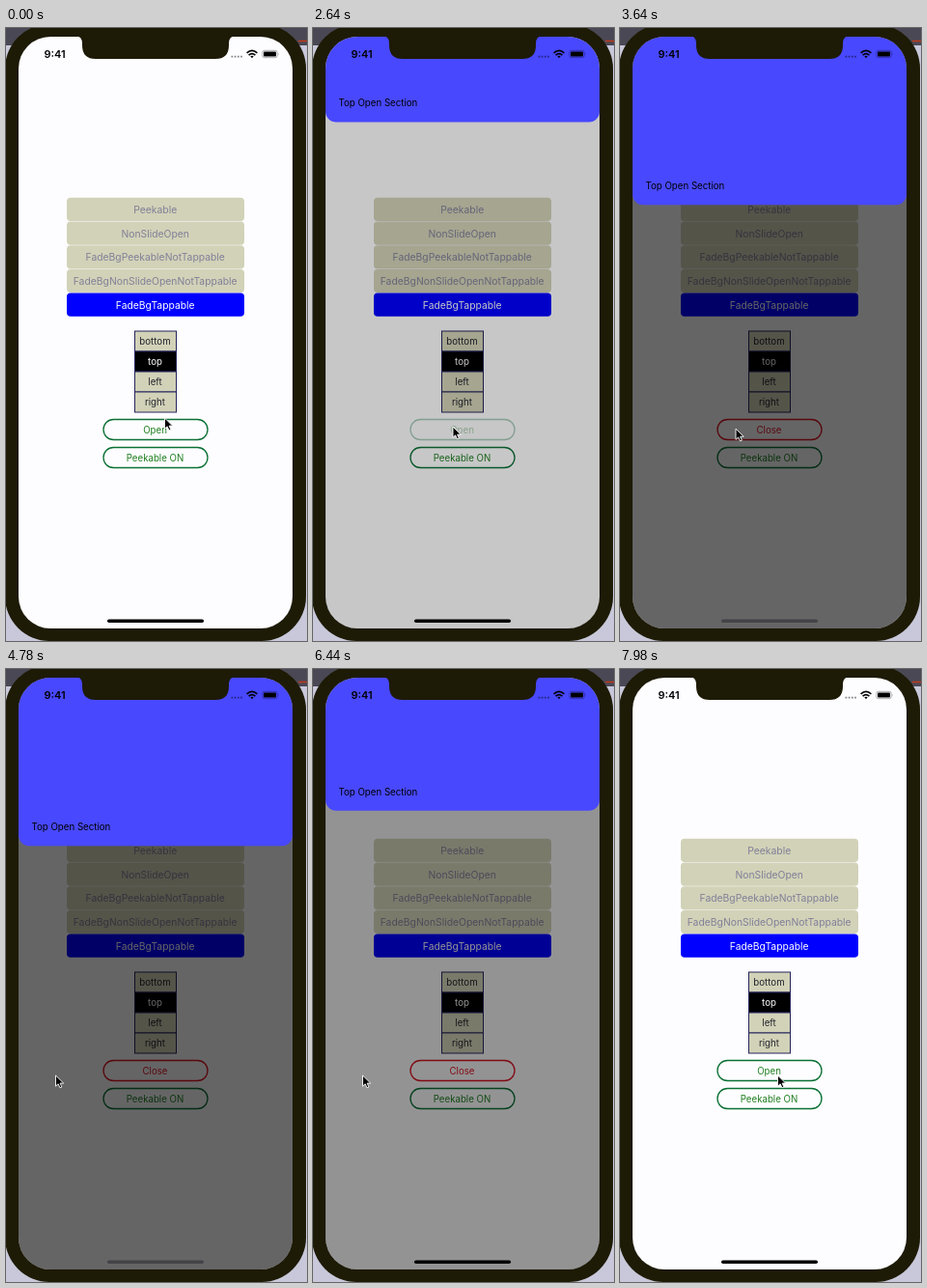
These frames come from a looping animation (312x635 px, 8 s). An HTML page:

```html
<!DOCTYPE html>
<html lang="en">
<head>
<meta charset="utf-8">
<style>
  html, body { margin: 0; width: 100%; height: 100%; overflow: hidden; background: #c8c8da; }
  svg { display: block; width: 100vw; height: 100vh; }
  text { font-family: Inter, sans-serif; font-size: 9.7px; }
  .mid { text-anchor: middle; }
  .pill { fill: #fdfdff; stroke-width: 1.3; }
</style>
</head>
<body>
<svg viewBox="0 0 312 635">
  <defs>
    <clipPath id="screen"><rect x="13" y="9" width="284" height="613" rx="33"/></clipPath>
  </defs>

  <rect width="312" height="635" fill="#c8c8da"/>
  <rect width="312" height="18" fill="#4a4854"/>
  <path d="M303 13.5H312" stroke="#c0391c" stroke-width="1.5"/>
  <rect x="-1" y="-4" width="312" height="639" rx="46" fill="#1d1a05"/>

  <g clip-path="url(#screen)">
    <rect x="13" y="9" width="284" height="613" fill="#fdfdff"/>
    <g id="options"></g>
    <g id="sides"></g>
    <g id="openButton">
      <rect class="pill" x="101" y="405.5" width="108" height="21" rx="10.5"/>
      <text class="mid" x="154.5" y="419.5"></text>
    </g>
    <rect class="pill" x="101" y="434.5" width="108" height="21" rx="10.5" stroke="#0b7034"/>
    <text class="mid" x="154.5" y="448.5" fill="#1f7f1f">Peekable ON</text>

    <rect id="shade" x="13" y="9" width="284" height="613"/>
    <g id="panel">
      <rect x="13" y="-260" width="284" height="260" rx="11" fill="#4848ff"/>
      <text x="26.5" y="-16.2">Top Open Section</text>
    </g>
    <rect id="homeBar" x="105" y="612.5" width="100" height="3.5" rx="1.75"/>
  </g>

  <path d="M73 8Q79 9 79 16V18Q79 32 93 32H217Q231 32 231 18V16Q231 9 237 8Z" fill="#1d1a05"/>
  <text x="39.5" y="31" style="font-size:11px;font-weight:600">9:41</text>
  <path d="M233.5 29.7H245" stroke="#0007" stroke-width="1.8" stroke-dasharray="1.8 1.4"/>
  <g fill="none" stroke="#000" stroke-width="1.7">
    <path d="M249.6 25.8Q255 21 260.4 25.8M251.6 28.1Q255 25.2 258.4 28.1"/>
  </g>
  <path d="M253.3 29.3Q255 28 256.7 29.3L255 31.2Z"/>
  <rect x="265.8" y="23.3" width="15.4" height="7.4" rx="2" fill="none" stroke="#0006" stroke-width=".8"/>
  <rect x="267" y="24.4" width="13" height="5.2" rx="1"/>
  <path d="M282.3 25.6q1.2 1.4 0 2.8z" fill="#0006"/>

  <path id="cursor" d="M0 0V11.2L2.6 8.8L4.5 12.8L6.4 12L4.6 8.1H8.2Z" stroke="#fff" stroke-width=".9"/>
</svg>
<script>
const $ = id => document.getElementById(id);
const LOOP = 8000, SLIDE = 466, OPEN_AT = 2406, CLOSE_AT = 6302;

const options = ['Peekable', 'NonSlideOpen', 'FadeBgPeekableNotTappable',
                 'FadeBgNonSlideOpenNotTappable', 'FadeBgTappable'];
$('options').innerHTML = options.map((label, i) => {
  const y = 175.8 + i * 24.7, active = i === 4;
  return `<rect x="63" y="${y}" width="184" height="24.2" rx="4" fill="${active ? '#00f' : '#d2d2b8'}"/>
    <text class="mid" x="154.7" y="${y + 16}" style="font-size:10.35px" fill="${active ? '#fff' : '#827f98'}">${label}</text>`;
}).join('');

$('sides').innerHTML = ['bottom', 'top', 'left', 'right'].map((label, i) => {
  const y = 314 + i * 21, active = i === 1;
  return `<rect x="133.5" y="${y}" width="43" height="21" fill="${active ? '#000' : '#d2d2b8'}" stroke="#24245c"/>
    <text class="mid" x="154.5" y="${y + 13.7}" fill="${active ? '#fff' : '#22222c'}">${label}</text>`;
}).join('');

const clamp = v => Math.min(1, Math.max(0, v));
const easeIn = v => v ** 1.68;
const easeInOut = v => v < .5 ? easeIn(2 * v) / 2 : 1 - easeIn(2 - 2 * v) / 2;
const ramp = (t, start, length) => easeInOut(clamp((t - start) / length));

// Pointer moves: start, duration, dx, dy
const moves = [[1300, 600, -19.5, 9], [3400, 700, -93.5, 8], [7000, 750, 112, 0]];
const label = $('openButton').querySelector('text');
const outline = $('openButton').querySelector('rect');

function draw(t) {
  const shown = ramp(t, OPEN_AT, SLIDE) - ramp(t, CLOSE_AT, SLIDE);
  $('panel').setAttribute('transform', `translate(0 ${9 + 174.3 * shown})`);
  $('shade').setAttribute('opacity', .6 * Math.max(0, shown) ** 1.5);
  $('homeBar').setAttribute('fill', shown > .9 ? '#444448' : '#000');

  const isOpen = t > OPEN_AT + SLIDE && t < CLOSE_AT + SLIDE;
  label.textContent = isOpen ? 'Close' : 'Open';
  label.setAttribute('fill', isOpen ? '#dc1420' : '#1f7f1f');
  outline.setAttribute('stroke', isOpen ? '#dc1420' : '#0b7034');
  const pressed = ramp(t, OPEN_AT - 60, 150) - ramp(t, 2810, 200);
  $('openButton').setAttribute('opacity', 1 - .65 * pressed);

  let x = 164.5, y = 404;
  for (const [start, length, dx, dy] of moves) {
    const k = ramp(t, start, length);
    x += dx * k;
    y += dy * k;
  }
  $('cursor').setAttribute('transform', `translate(${x} ${y})`);
}

function tick() {
  draw(performance.now() % LOOP);
  requestAnimationFrame(tick);
}
tick();
</script>
</body>
</html>
```
